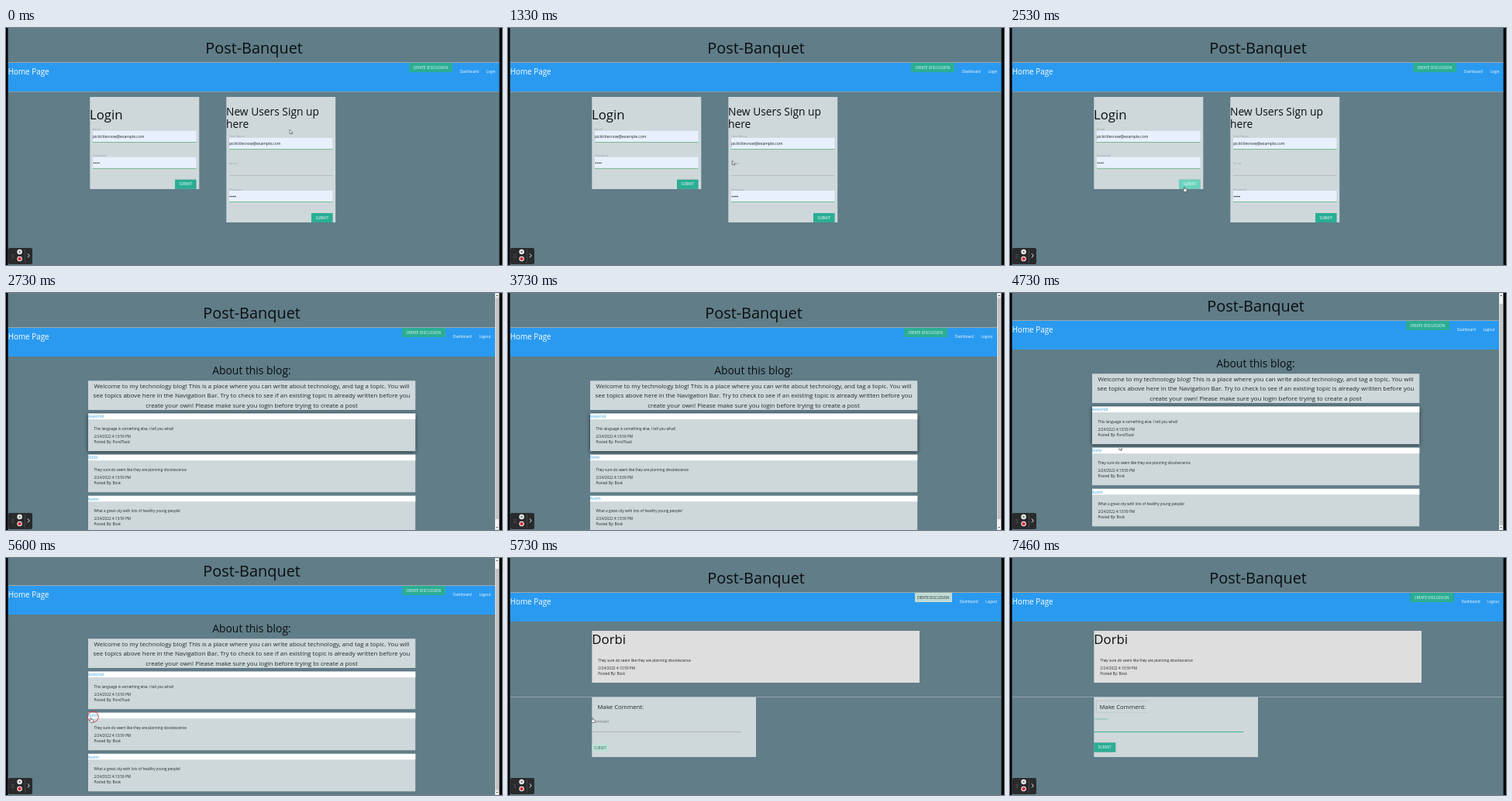
These frames come from a looping animation (640x306 px, 8 s). An HTML page:

```html
<!DOCTYPE html>
<html lang="en">
<head>
<meta charset="utf-8">
<title>Post-Banquet</title>
<style>
  html, body { margin: 0; width: 100%; height: 100%; overflow: hidden; background: #607d88; }
  svg { display: block; width: 100%; height: 100%; }
  text { font-family: "Open Sans", "Noto Sans", sans-serif; white-space: pre; }
  .low { filter: drop-shadow(0 .6px .6px rgba(0,0,0,.35)); }
  .high { filter: drop-shadow(0 1.6px 2.4px rgba(0,0,0,.6)); }
</style>
</head>
<body>
<svg id="stage" viewBox="0 0 640 306" preserveAspectRatio="none"></svg>
<script>
const LOOP = 8000;
const FEED_AT = 2660, POST_AT = 5730, STYLED_AT = 5800, FOCUS_AT = 7000;
const INK = '#20282b', TEAL = '#2aae94', CARD = '#ced7da';
const MAIL = 'picktitlesnow@example.com';

const rect = (x, y, x2, y2, fill, extra = '') =>
  `<rect x="${x}" y="${y}" width="${x2 - x}" height="${y2 - y}" fill="${fill}" ${extra}/>`;
const text = (x, y, size, str, fill = INK, extra = '') =>
  `<text x="${x}" y="${y}" font-size="${size}" fill="${fill}" ${extra}>${str}</text>`;
const centred = (x, y, size, str, fill) => text(x, y, size, str, fill, 'text-anchor="middle"');
const group = (id, body, extra = '') => `<g id="${id}" ${extra}>${body}</g>`;

const button = (x, y, w, label, id = '') =>
  rect(x, y, x + w, y + 12, TEAL, `rx=".6" class="low" ${id && `id="${id}"`}`) +
  text(x + 5.4, y + 7.6, 4.4, label, '#fff', 'letter-spacing=".165"');

// Title strip and navigation bar; dx shifts the links to suit the page width.
function header(right, dx, lastLink, lastX, create) {
  return centred((3 + right) / 2, 33.2, 19.9, 'Post-Banquet', '#0b0e10') +
    rect(3, 45, right, 82, '#2a9af0', 'class="low"') +
    rect(3, 44.2, right, 45, '#a9b4b8') +
    text(2.7, 60, 9.9, 'Home Page', '#fff') +
    create +
    text(577 + dx, 57.6, 4.65, 'Dashboard', '#fff') +
    text(lastX, 57.6, 4.65, lastLink, '#fff');
}

const label = (x, y, str) => text(x, y, 3.8, str, '#9aa3a6');

function filledInput(x, y, value) {
  return rect(x, y, x + 133.5, y + 14.4, '#e8f0fe') +
    rect(x, y + 14.2, x + 133.5, y + 14.9, '#4caf6a') + value;
}
const mailInput = (x, y) => filledInput(x, y, text(x, y + 8.7, 5.02, MAIL));
const dots = (x, y) => [0, 1, 2, 3].map(i =>
  `<circle cx="${x + 1.4 + i * 2.2}" cy="${y + 7.6}" r=".8" fill="${INK}"/>`).join('');
const passInput = (x, y) => filledInput(x, y, dots(x, y));

function loginPage() {
  return header(637, 9, 'Login', 619.7, button(520, 45, 56, 'CREATE DISCUSSION')) +
    rect(3, 82, 637, 82.6, '#9fb0b8') +
    rect(108.3, 89, 249.3, 208, CARD) +
    text(108, 118, 16.8, 'Login', '#0b0e10') +
    label(112, 132.2, 'Email') + mailInput(112, 132.8) +
    label(112, 166.2, 'Password') + passInput(112, 166.7) +
    button(218, 195.8, 27.4, 'SUBMIT', 'enter') +
    rect(284.3, 89, 425.2, 251, CARD) +
    text(284, 112.6, 13.8, 'New Users Sign up', '#0b0e10') +
    text(284, 128.6, 13.8, 'here', '#0b0e10') +
    label(288, 141.4, 'User Name') + mailInput(288, 141.8) +
    label(288, 175.6, 'Email') + rect(288, 190, 421.5, 190.5, '#9a9fa1') +
    label(288, 209.8, 'Password') + passInput(288, 210) +
    button(394, 239, 27.4, 'SUBMIT');
}

const details = (x, y, body, author) =>
  text(x, y, 4.7, body) +
  text(x, y + 10.2, 4.7, '2/24/2022 4:13:59 PM') +
  text(x, y + 17.5, 4.7, 'Posted By: ' + author);

function entry(i, title, body, author) {
  const y = 155.6 + i * 53.1;
  return group('entry' + i, rect(106, y, 528.3, y + 48.6, CARD), 'class="low"') +
    rect(106, y, 528.3, y + 7.5, '#fff') +
    text(105.8, y + 5.7, 4.7, title, '#2b9fe0') +
    details(113.4, y + 21.1, body, author);
}

function feedPage() {
  const intro = [
    'Welcome to my technology blog! This is a place where you can write about technology, and tag a topic. You will',
    'see topics above here in the Navigation Bar. Try to check to see if an existing topic is already written before you',
    'create your own! Please make sure you login before trying to create a post'
  ];
  return group('scroller',
    header(631, 0, 'Logout', 610.4, button(511, 45, 56, 'CREATE DISCUSSION')) +
    centred(317, 105.3, 13.9, 'About this blog:', '#0b0e10') +
    rect(106, 113.2, 528.3, 151, CARD) +
    intro.map((s, i) => centred(317, 122.7 + i * 12.5, 7.95, s)).join('') +
    entry(0, 'Javascript', 'This language is something else, I tell you what!', 'PondToad') +
    entry(1, 'Dorbi', 'They sure do seem like they are planning obsolescence', 'Bosk') +
    entry(2, 'Austin', 'What a great city with lots of healthy young people!', 'Bosk')) +
    rect(631, 0, 636.5, 306, '#f1f1f1') +
    rect(631.6, 6, 635.9, 292, '#c4c4c4', 'id="thumb"') +
    '<path d="M632.4 4L633.7 2.2L635 4Z" fill="#505050"/>' +
    '<path d="M632.4 302L633.7 303.8L635 302Z" fill="#505050"/>';
}

function postPage() {
  const bare = rect(525, 45, 573, 57, '#bfdcd3') + text(527.7, 53, 4.4, 'CREATE DISCUSSION');
  const dressed = button(516.4, 45, 56.4, 'CREATE DISCUSSION', 'create');
  return header(637, 5.7, 'Logout', 616,
      group('bareNav', bare) + group('dressedNav', dressed)) +
    rect(108.3, 94, 531, 161, '#dedede', 'class="low"') +
    text(108.3, 110.5, 16.8, 'Dorbi', '#0b0e10') +
    details(116.3, 133.5, 'They sure do seem like they are planning obsolescence', 'Bosk') +
    rect(3, 179, 637, 179.8, '#a3b0b5') +
    rect(108.3, 179.6, 320, 257, CARD) +
    group('badge', rect(111.5, 184.6, 179, 199.2, CARD, 'class="low"')) +
    text(115.6, 195.2, 7.75, 'Make Comment:') +
    text(108.4, 212.5, 4.7, 'Comment', '#6f777a', 'id="hint"') +
    rect(108.3, 224, 301, 224.5, '#9a9fa1', 'id="rule"') +
    group('bareSend', rect(108.6, 240, 129.6, 250.3, '#bfe0d6') + text(111, 247, 4.4, 'SUBMIT', '#2b7565')) +
    group('dressedSend', button(108.4, 238.5, 27.8, 'SUBMIT', 'send'));
}

function recorder() {
  const grip = [0, 1, 2].map(i => [0, 1].map(j =>
    `<circle cx="${8 + j * 1.8}" cy="${292.4 + i * 2}" r=".45" fill="#aaa"/>`).join('')).join('');
  return rect(3, 284, 34, 305, '#292a2c', 'rx="2"') + grip +
    '<circle cx="17.6" cy="289" r="3.2" fill="#f4f4f4"/>' +
    '<path d="M16.4 287.8l2.4 2.4m0 -2.4l-2.4 2.4" stroke="#222" stroke-width=".8"/>' +
    '<circle cx="17.6" cy="298" r="3.2" fill="#f4f4f4"/>' +
    '<circle cx="17.6" cy="298" r="2.3" fill="#d8323c"/>' +
    rect(24, 285.5, 24.4, 303.5, '#666') +
    '<path d="M28 291.4l2.2 2.5l-2.2 2.5" fill="none" stroke="#fff" stroke-width=".9"/>';
}

const pen = 'fill="#fff" stroke="#222" stroke-width=".5" stroke-linejoin="round"';
document.getElementById('stage').innerHTML =
  rect(0, 0, 640, 306, '#607d88') +
  group('login', loginPage()) + group('feed', feedPage()) + group('post', postPage()) +
  rect(0, 0, 2.6, 306, '#050505') + rect(636.6, 0, 640, 306, '#050505') +
  recorder() +
  '<circle id="ring" cx="112.3" cy="205" r="7" fill="none" stroke="#d8323c" stroke-width=".9"/>' +
  group('arrow', `<path d="M0 0V5.6L1.4 4.4L2.3 6.3L3.2 5.9L2.4 4.1H4.1Z" ${pen}/>`) +
  group('hand', `<path d="M-.6 .5Q0 -.4 .6 .5V2.5L2.9 3.1Q3.4 3.4 3.2 4.4L2.6 6.6H-.2L-1.9 4Q-1.6 3.2 -.6 4Z" ${pen}/>`);

const el = {};
document.querySelectorAll('[id]').forEach(n => el[n.id] = n);

const show = (node, on) => node.setAttribute('display', on ? 'inline' : 'none');
const span = (t, a, b) => Math.min(1, Math.max(0, (t - a) / (b - a)));
const smooth = p => p * p * (3 - 2 * p);
const mix = (a, b, p) => a + (b - a) * p;
const blend = (a, b, p) => `rgb(${a.map((v, i) => Math.round(mix(v, b[i], p)))})`;
const TEAL_RGB = [42, 174, 148];

// Pointer position and shape; no shape means hidden.
function pointer(t) {
  if (t < FEED_AT) {
    const p = smooth(span(t, 130, 2400));
    const x = mix(366, 225, p), y = mix(131, 205, p);
    return { x, y, shape: x < 245.4 && y > 195.8 ? 'hand' : 'arrow' };
  }
  if (t < POST_AT) {
    const p = smooth(span(t, 4100, 5200));
    const shape = t < 4100 ? '' : p > .95 ? 'hand' : 'arrow';
    return { x: mix(190, 109.4, p), y: mix(184, 206, p), shape };
  }
  return { x: 109, y: 206, shape: t < 6400 ? 'hand' : '' };
}

function draw(t) {
  const onLogin = t < FEED_AT, onPost = t >= POST_AT;
  show(el.login, onLogin);
  show(el.feed, !onLogin && !onPost);
  show(el.post, onPost);

  const at = pointer(t);
  for (const shape of ['arrow', 'hand']) {
    show(el[shape], at.shape === shape);
    el[shape].setAttribute('transform', `translate(${at.x} ${at.y})`);
  }
  const over = onLogin && at.shape === 'hand';
  el.enter.setAttribute('fill', over ? blend(TEAL_RGB, [104, 211, 188], span(t, 1900, 2300)) : TEAL);

  const scroll = 9 * smooth(span(t, 3730, 3930));
  el.scroller.setAttribute('transform', `translate(0 ${-scroll})`);
  el.thumb.setAttribute('y', 6 + scroll * .88);
  el.entry0.setAttribute('class', t < 4900 ? 'high' : 'low');
  show(el.ring, t >= 5530 && !onPost);

  const styled = t >= STYLED_AT;
  for (const part of ['Nav', 'Send']) {
    show(el['bare' + part], !styled);
    show(el['dressed' + part], styled);
  }
  const tint = blend([150, 208, 192], TEAL_RGB, span(t, STYLED_AT, 6000));
  el.create.setAttribute('fill', tint);
  el.send.setAttribute('fill', tint);
  el.badge.setAttribute('opacity', span(t, POST_AT, 6000));

  const focus = smooth(span(t, FOCUS_AT, FOCUS_AT + 200));
  el.hint.setAttribute('y', mix(212.5, 208.8, focus));
  el.hint.setAttribute('font-size', mix(4.7, 3.8, focus));
  el.hint.setAttribute('fill', blend([111, 119, 122], [70, 178, 156], focus));
  el.rule.setAttribute('fill', blend([140, 146, 148], TEAL_RGB, focus));
  el.rule.setAttribute('height', mix(.5, .9, focus));
}

const start = performance.now();
function tick() {
  draw((performance.now() - start) % LOOP);
  requestAnimationFrame(tick);
}
tick();
</script>
</body>
</html>
```
